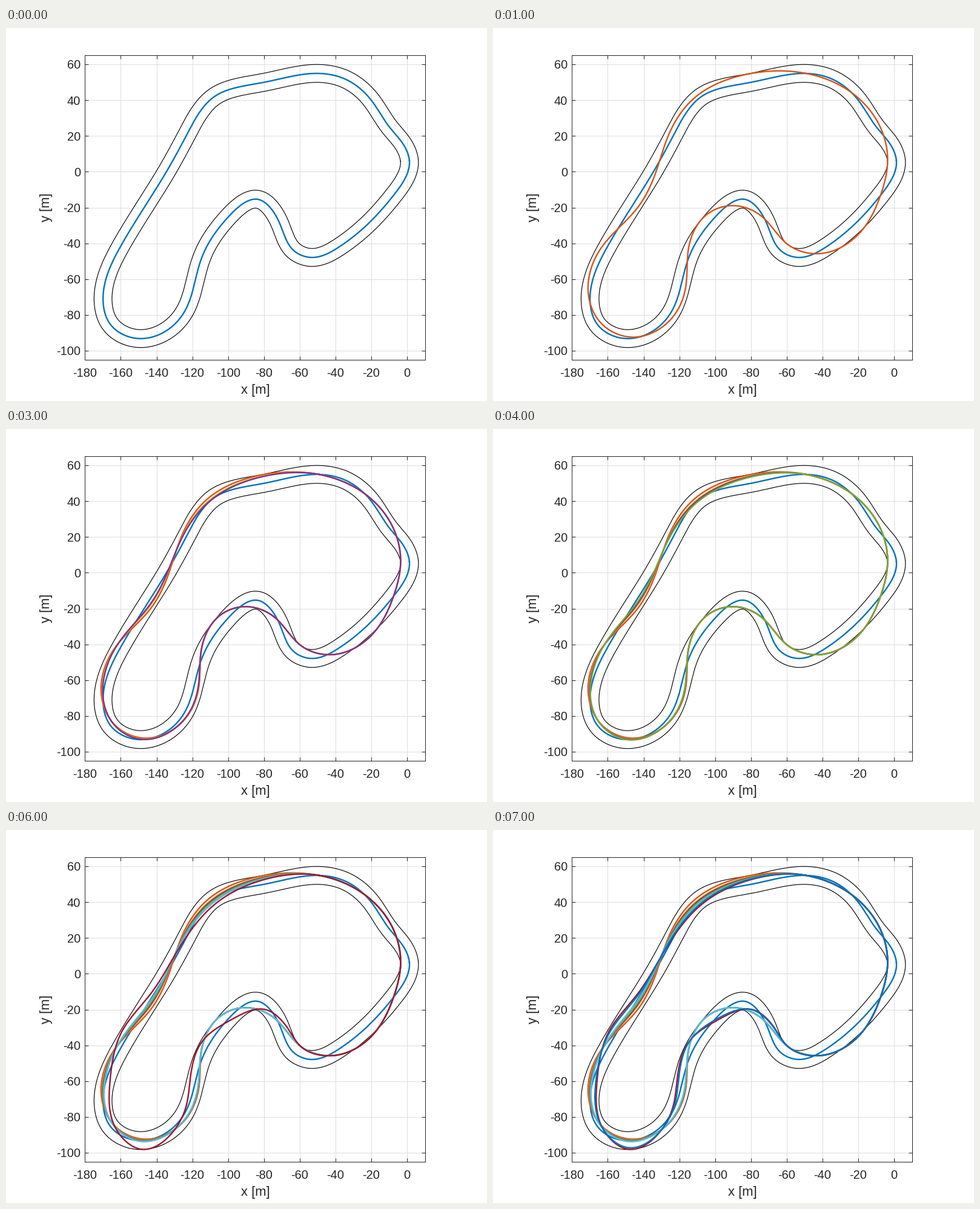
A matplotlib script for the animation above (8 s loop, 794 px wide and 616 px high).

```python
import numpy as np
import matplotlib.pyplot as plt
from matplotlib.animation import FuncAnimation

W, H, DPI = 794, 616, 64
LEFT, RIGHT, TOP, BOTTOM = 130.35, 691.6, 45.4, 547.8
DARK = "#262626"
COLORS = ["#0072BD", "#D95319", "#EDB120", "#7E2F8E",
          "#77AC30", "#4DBEEE", "#A2142F", "#0072BD"]
HALF_WIDTH = 5.0  # metres

# Key points in metres; splines fill in the rest.
CENTRE = [
    (1.3, 6.3), (-7.6, -13.2), (-20, -27.3), (-38, -42), (-54.5, -47.8),
    (-63, -44.3), (-72, -27), (-83.3, -15.4), (-101, -26.4), (-115.8, -51),
    (-124.3, -78), (-132, -87), (-151, -93.1), (-166, -85), (-169.9, -71.5),
    (-160, -41.5), (-134.5, 0), (-123.5, 20), (-108, 41.8), (-80, 50),
    (-47.5, 54.9), (-35, 52), (-20, 40), (-10, 25.2), (-2, 15.2),
]
# All racing lines share the eastern part of the lap.
EAST = [
    (-49.2, 55), (-25.2, 45.3), (-8.3, 26.2), (-3.6, 7), (-7.6, -13.2),
    (-19.8, -34.8), (-41.5, -45.7), (-59.4, -40.6),
]
WIDE = EAST + [
    (-73.6, -25.2), (-90.2, -18.9), (-104.7, -23.9), (-114.6, -41.3),
    (-116.3, -63.5), (-123, -80.3), (-146, -92.4), (-164, -84.3),
    (-171, -65.6), (-164, -43), (-143, -19.6), (-132.8, 0.7),
    (-126, 20.6), (-113, 40), (-79.7, 55),
]
SHORT = EAST + [
    (-66.3, -31), (-79.5, -19.9), (-98, -25.5), (-115, -38.5),
    (-120.9, -56.5), (-125.2, -79), (-148.8, -98), (-162.3, -87.3),
    (-166, -60), (-159.5, -32.5), (-143, -10.8), (-130, 10),
    (-107.5, 38.8), (-79, 52.9),
]


def closed_spline(points, per=60):
    """Periodic cubic spline over chord length, as complex numbers."""
    z = np.array([complex(*p) for p in points])
    n = len(z)
    step = np.roll(z, -1) - z
    h = np.abs(step)
    slope = step / h
    a = np.zeros((n, n))
    for i in range(n):
        a[i, i - 1] = h[i - 1]
        a[i, i] = 2 * (h[i - 1] + h[i])
        a[i, (i + 1) % n] = h[i]
    m = np.linalg.solve(a, 6 * (slope - np.roll(slope, 1)))
    t = np.arange(per) / per
    s = 1 - t
    h, m0, m1 = h[:, None], m[:, None], np.roll(m, -1)[:, None]
    curve = (s * z[:, None] + t * np.roll(z, -1)[:, None]
             + h**2 / 6 * ((s**3 - s) * m0 + (t**3 - t) * m1))
    return curve.ravel()


def even_loop(points, n=800):
    """The spline resampled at equal distances."""
    z = closed_spline(points)
    z = np.append(z, z[0])
    dist = np.concatenate(([0], np.cumsum(np.abs(np.diff(z)))))
    at = np.arange(n) * dist[-1] / n
    return np.interp(at, dist, z.real) + 1j * np.interp(at, dist, z.imag)


def offset(loop, d):
    tangent = np.roll(loop, -1) - np.roll(loop, 1)
    return loop + 1j * d * tangent / np.abs(tangent)


def pt(pixels):
    return pixels * 72 / DPI


def label(x, y, text, size, ha="center", **kw):
    fig.text(x / W, 1 - y / H, text, fontsize=pt(size), ha=ha,
             va="baseline", color=DARK, **kw)


def draw(loop, color, width):
    z = np.append(loop, loop[0])
    return ax.plot(z.real, z.imag, color=color, lw=pt(width))[0]


plt.rcParams["font.family"] = "Liberation Sans"
fig = plt.figure(figsize=(W / DPI, H / DPI), dpi=DPI, facecolor="white")
ax = fig.add_axes([LEFT / W, 1 - BOTTOM / H,
                   (RIGHT - LEFT) / W, (BOTTOM - TOP) / H])
ax.set_xlim(-180, 10)
ax.set_ylim(-105, 65)
xticks, yticks = range(-180, 1, 20), range(-100, 61, 20)
ax.set_xticks(xticks)
ax.set_yticks(yticks)
ax.tick_params(direction="in", length=pt(5.6), width=pt(1), color=DARK,
               top=True, right=True, labelbottom=False, labelleft=False)
ax.grid(color="#DEDEDE", lw=pt(1))
ax.set_axisbelow(True)
for side in ax.spines.values():
    side.set(color=DARK, linewidth=pt(1))

for v in xticks:
    label(LEFT + (v + 180) * (RIGHT - LEFT) / 190, 576, str(v), 20)
for v in yticks:
    label(123, TOP + (65 - v) * (BOTTOM - TOP) / 170 + 7.3, str(v), 20, "right")
label(411.5, 604, "x [m]", 22)
label(72, 296.5, "y [m]", 22, rotation=90, rotation_mode="anchor")

centre = even_loop(CENTRE)
for d in (-HALF_WIDTH, HALF_WIDTH):
    draw(offset(centre, d), "black", 1.15)

# Early laps drift from the wide to the short line, more so late in the lap.
wide, short = even_loop(WIDE), even_loop(SHORT)
drift = 0.9 * np.clip(np.linspace(-0.67, 1, len(wide)), 0, 1)
shares = [k * drift for k in (0, 0.4, 0.55, 0.75, 1)] + [1, 0.85]
loops = [centre] + [wide + k * (short - wide) for k in shares]
lines = [draw(loop, c, 2.4) for loop, c in zip(loops, COLORS)]


def update(frame):
    for i, line in enumerate(lines):
        line.set_visible(i <= frame)
    return lines


anim = FuncAnimation(fig, update, frames=len(lines), interval=1000,
                     repeat=True, repeat_delay=0, blit=False)
plt.show()
```
